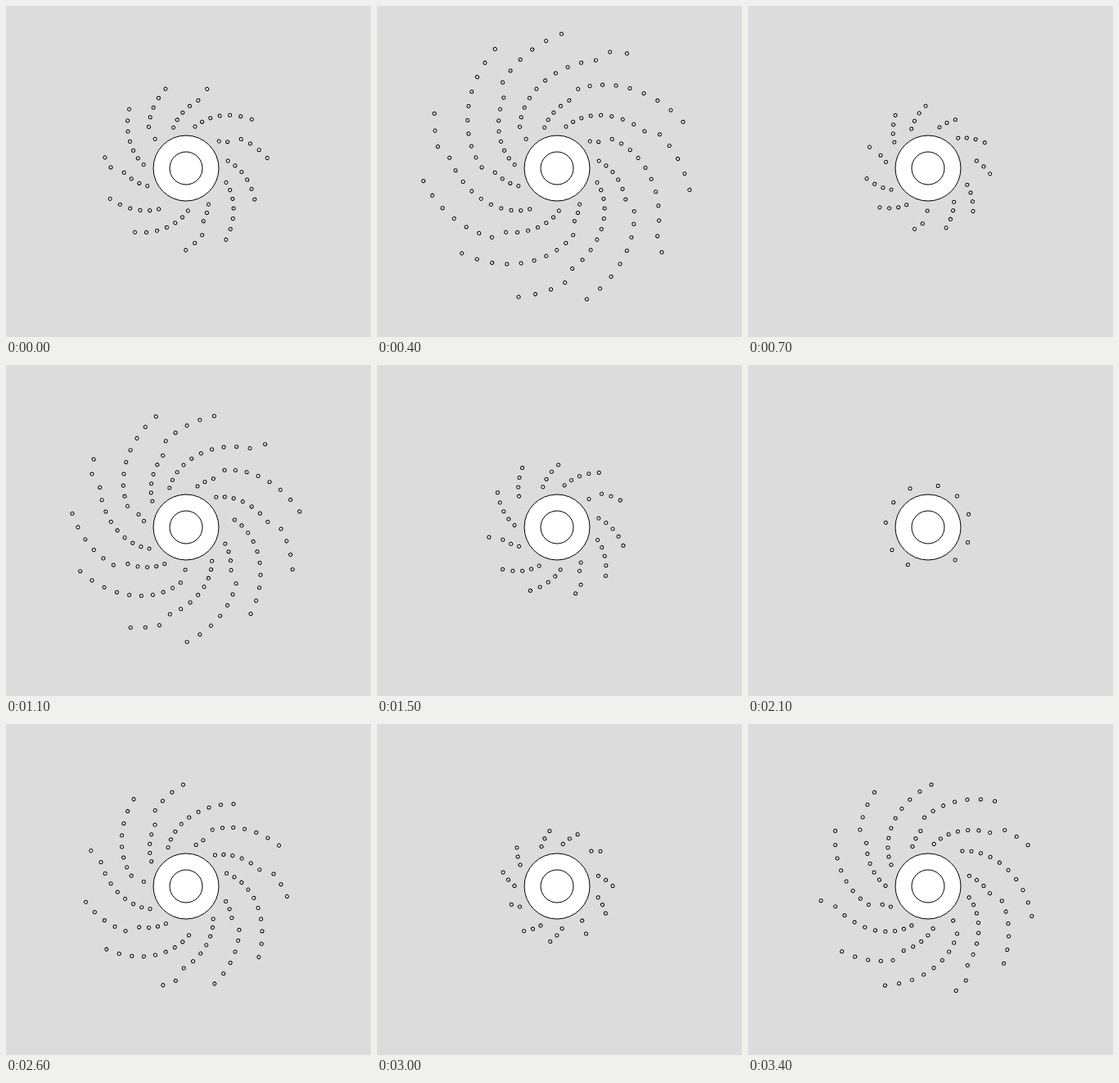
These frames come from a looping animation (446 by 404 pixels, 3500 ms). An HTML page:

```html
<!DOCTYPE html>
<html lang="en">
<head>
<meta charset="utf-8">
<title>Dotted spiral</title>
<style>
  html, body { margin: 0; width: 100%; height: 100%; overflow: hidden; background: #dcdcdc; }
  svg { display: block; width: 446px; height: 404px; }
  circle { fill: #fff; stroke: #000; stroke-width: 1; }
</style>
</head>
<body>
<svg viewBox="0 0 446 404">
  <g transform="translate(220 198)">
    <circle r="40"/>
    <circle r="20"/>
    <g id="rings"></g>
  </g>
</svg>
<script>
const LOOP = 3500, TICK = 100;
const SLOTS = 16, RINGS = 15, DOTS = 10;
const FIRST_RADIUS = 52, RADIUS_STEP = 8;
const START_ANGLE = 223.3, RING_TURN = 104.227, DOT_TURN = 97.36;

const SVG_NS = 'http://www.w3.org/2000/svg';
const make = (tag, parent) => parent.appendChild(document.createElementNS(SVG_NS, tag));

// Each ring is ten dots; it is turned as a whole when its burst starts.
const rings = Array.from({ length: RINGS }, (_, k) => {
  const ring = make('g', document.getElementById('rings'));
  const radius = FIRST_RADIUS + k * RADIUS_STEP;
  for (let i = 0; i < DOTS; i++) {
    const angle = i * DOT_TURN * Math.PI / 180;
    const dot = make('circle', ring);
    dot.setAttribute('cx', radius * Math.cos(angle));
    dot.setAttribute('cy', radius * Math.sin(angle));
    dot.setAttribute('r', 2);
  }
  return ring;
});

// Two rings per tick; every other burst runs one ring late in its middle.
function ringsDrawn(tick) {
  const phase = tick % SLOTS;
  return 7 + 2 * tick - (phase >= 6 && phase <= 11 ? 1 : 0);
}

function render(time) {
  const drawn = ringsDrawn(Math.floor((time % LOOP) / TICK));
  const visible = drawn % SLOTS;
  const first = drawn - visible;
  rings.forEach((ring, k) => {
    ring.setAttribute('display', k < visible ? 'inline' : 'none');
    ring.setAttribute('transform', `rotate(${(START_ANGLE + (first + k) * RING_TURN) % 360})`);
  });
}

const start = performance.now();
function loop() {
  render(performance.now() - start);
  requestAnimationFrame(loop);
}
loop();
</script>
</body>
</html>
```
